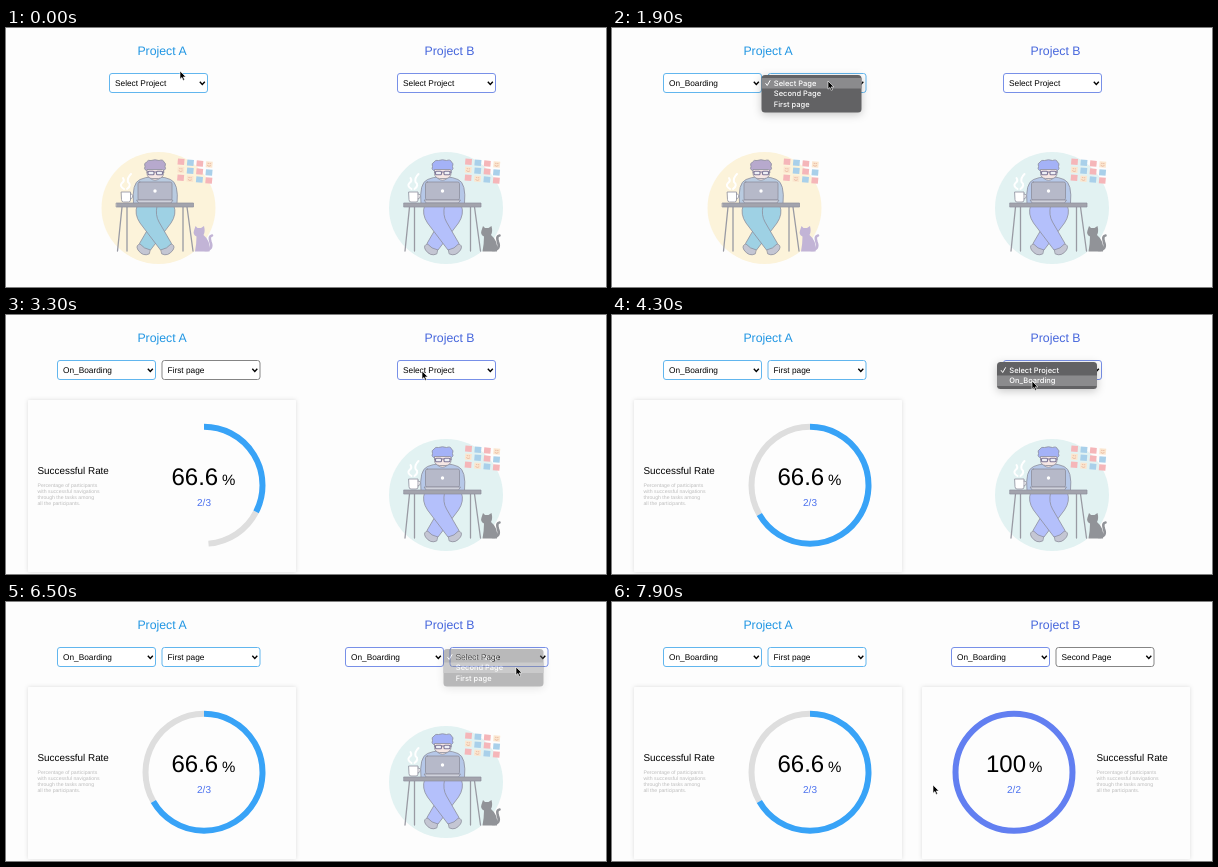
These frames come from a looping animation (600 by 259 pixels, 8000 ms). An HTML page:

```html
<!DOCTYPE html>
<html lang="en">
<head>
<meta charset="utf-8">
<title>Project comparison</title>
<style>
html, body { margin: 0; width: 100%; height: 100%; overflow: hidden; background: #fdfdfd; }
svg { display: block; width: 600px; height: 259px; font-family: "Liberation Sans", Arial, sans-serif; text-rendering: geometricPrecision; }
.card { fill: #fdfdfd; filter: drop-shadow(0 0 2px rgba(0,0,0,.13)); }
.menu { filter: drop-shadow(0 2px 4px rgba(0,0,0,.22)); font-family: Inter, sans-serif; font-weight: 500; }
</style>
</head>
<body>
<svg id="stage" viewBox="0 0 600 259"></svg>
<script>
const LOOP = 8000;
const stage = document.getElementById('stage');

const text = (x, y, size, fill, str, anchor = 'start') =>
  `<text x="${x}" y="${y}" font-size="${size}" fill="${fill}" text-anchor="${anchor}">${str}</text>`;
const clamp = v => Math.max(0, Math.min(1, v));

// Solves cubic-bezier(.25,.1,.25,1) for progress p.
function ease(p) {
  let lo = 0, hi = 1;
  for (let i = 0; i < 20; i++) {
    const u = (lo + hi) / 2, v = 1 - u;
    if (.75 * v * v * u + .75 * v * u * u + u * u * u < p) lo = u; else hi = u;
  }
  const u = (lo + hi) / 2, v = 1 - u;
  return .3 * v * v * u + 3 * v * u * u + u * u * u;
}

const sides = [
  {
    title: 'Project A', mid: 156, titleColor: '#2196e3', border: '#62b6ee',
    single: 103.5, pair: [51.5, 156], artX: 0,
    art: { disc: '#fcf3da', hair: '#b7a9cd', shirt: '#b9cbe0', jeans: '#9ed1e4', cat: '#c2b4d6' },
    project: { open: 250, close: 1000 }, page: { open: 1750, close: 2550 },
    pages: 'First page', cardAt: 2800, ringAt: 2985, grayUntil: 3650,
    card: 22, ring: 198, copy: 31.5, color: '#38a3f7', share: 2 / 3,
    value: '66.6', valueX: 165.5, percentX: 216, ratio: '2/3'
  },
  {
    title: 'Project B', mid: 443.5, titleColor: '#4666dc', border: '#7890e8',
    single: 391.5, pair: [339.5, 444], artX: 287.5,
    art: { disc: '#e2f2f2', hair: '#a4b2f7', shirt: '#b6c8e8', jeans: '#b4c0fb', cat: '#919398' },
    project: { open: 3650, close: 4400 }, page: { open: 5550, close: 6400 },
    pages: 'Second Page', cardAt: 6650, ringAt: 6700, grayUntil: Infinity,
    card: 310, ring: 402, copy: 484.5, color: '#627ff1', share: 1,
    value: '100', valueX: 374, percentX: 417, ratio: '2/2'
  }
];

// Cursor tip: time, x, y
const path = [
  [0, 174, 43], [200, 175, 51], [450, 175, 52], [900, 171, 66], [1100, 171, 66],
  [1650, 216, 53], [1950, 216, 53], [2400, 203, 76], [2600, 203, 76],
  [3250, 416, 56], [3800, 417, 56], [4200, 420, 66], [4500, 420, 66],
  [5100, 522, 62], [5250, 522, 62], [5500, 512, 56], [5750, 512, 56],
  [6150, 510, 65], [6550, 510, 65], [7400, 321, 183], [LOOP, 321, 183]
];

function cursorAt(t) {
  const i = Math.max(1, path.findIndex(k => k[0] > t));
  const [t0, x0, y0] = path[i - 1], [t1, x1, y1] = path[i];
  const p = clamp((t - t0) / (t1 - t0)), s = p * p * (3 - 2 * p);
  return { x: x0 + (x1 - x0) * s, y: y0 + (y1 - y0) * s };
}

function notes() {
  const colors = ['#f5b6b9', '#a9d0ea', '#fbe6cf'];
  const order = [0, 1, 0, 2, 2, 1, 0, 1, 0, 2, 1, 0];
  return order.map((c, i) => {
    const col = i % 4, row = i >> 2;
    const x = 172 + col * 9.4 - row * .2, y = 130.500 + row * 8 + col * .9;
    const mark = c === 2 ? `<path d="M${x + 1.6} ${y + 4.2}q1.6 1.5 3.2 0M${x + 2} ${y + 2}h.6M${x + 4} ${y + 2}h.6" stroke="#e0a58e" stroke-width=".6" fill="none"/>` : '';
    return `<g transform="rotate(5 ${x} ${y})"><rect x="${x}" y="${y}" width="6.6" height="6" fill="${colors[c]}"/>${mark}</g>`;
  }).join('');
}
const noteWall = notes();

function worker({ art: c, artX }) {
  const line = '#8d8f9c';
  // One leg with its shoe, running from the left hip to the right foot.
  const leg = `
    <path d="M155 221L164 215.500Q170 217 167 222Q162 229 156 226Z" fill="#c4c6d3"/>
    <path d="M131 178Q128 186 134 195L154.500 222Q161 221 165.500 215.500L153 194Q149 187 151 178Z" fill="${c.jeans}"/>`;
  return `<g transform="translate(${artX})" stroke-linejoin="round" stroke-linecap="round">
    <ellipse cx="152.5" cy="180" rx="57" ry="56" fill="${c.disc}"/>
    ${noteWall}
    <g stroke="${line}" stroke-width=".8">
      <g transform="matrix(-1 0 0 1 299 0)">${leg}</g>${leg}
      <path d="M127.500 176Q125.500 155 134 151.500Q140 149 145 149h8Q159 149 164.500 151.500Q173 155 171 176z" fill="${c.shirt}"/>
      <path d="M144.500 147v3.500q4.500 3.500 9 0v-3.500z" fill="#f6e7e4"/>
      <rect x="141" y="136" width="16.500" height="14.500" rx="5" fill="#f6e7e4"/>
      <path d="M140 142.500q-2.500-1.500-1-4q-1.500-3 1.500-4.500q1.500-2.500 4.500-1.500q4-1.500 8 0q4-1.500 5 1.500q2.500 1.500 1 4.500q1.500 2.500-1 4l-1.500-1h-15z" fill="${c.hair}"/>
    </g>
    <g fill="#eef0f6" stroke="#7f7898" stroke-width="1.100">
      <path d="M141 144h17" fill="none"/>
      <rect x="142" y="143.300" width="6" height="3.400" rx="1"/><rect x="150.500" y="143.300" width="6" height="3.400" rx="1"/>
    </g>
    <g stroke="${line}" stroke-width=".8">
      <rect x="132" y="154" width="34" height="18" rx="1.800" fill="#b6b9c9"/>
      <path d="M131 172h36l-2 3h-32z" fill="#cfd1db"/>
      <path d="M115.500 164h9v8q0 2-2 2h-5q-2 0-2-2zM124.500 166q3 0 2 3q-.5 2-2 2" fill="#fff"/>
    </g>
    <circle cx="149" cy="163" r="1.700" fill="#fff"/>
    <path d="M118 161q-5-3-2-6q3-2 1-5M121 161q5-4 1-7q-1-4 3-8" fill="none" stroke="#fff" stroke-width="2"/>
    <path d="M116 179L111.500 223M121 179V223M177 179V223M181 179L187 223" stroke="#999aa3" stroke-width="1.300"/>
    <rect x="110.500" y="175" width="77" height="4" fill="#a3a4ad" stroke="${line}" stroke-width=".7"/>
    <path d="M199 222Q207.500 222 204.500 214Q202.500 208 206 207.500" fill="none" stroke="${c.cat}" stroke-width="2.600"/>
    <path d="M189.500 198l2 2h3.500l3-2q1.500 6-.5 9q7.500 6 6 16.500h-14.500q1.500-8 1.500-15q-4-2-2.500-6z" fill="${c.cat}"/>
  </g>`;
}

const select = (x, label, border) =>
  `<rect x="${x}" y="45.500" width="98" height="19" rx="2.500" fill="#fff" stroke="${border}"/>
  ${text(x + 5.5, 58, 8.3, '#000', label)}
  <path d="M${x + 90.3} 53.700l2.500 2.700l2.500-2.700" fill="none" stroke="#000" stroke-width="1.400"/>`;

function menu(selectX, items, span, t, cursor) {
  const alpha = t < span.open ? 0 : 1 - clamp((t - span.close) / 180);
  if (!alpha) return '';
  const x = selectX - 6.5, row = 10.5;
  const hot = Math.max(0, Math.min(items.length - 1, Math.floor((cursor.y - 49) / row)));
  return `<g class="menu" opacity="${alpha}">
    <rect x="${x}" y="47" width="100" height="${6 + row * items.length}" rx="3.500" fill="#626264"/>
    <rect x="${x}" y="${50 + hot * row}" width="100" height="${row}" fill="#8b8b8d"/>
    <path d="M${x + 4} 55.200l1.700 2.300l3-5.200" fill="none" stroke="#fff" stroke-width="1"/>
    ${items.map((s, i) => text(x + 12.3, 57.9 + i * row, 7.5, '#fff', s)).join('')}
  </g>`;
}

function arc(cx, from, to, color) {
  if (to - from < .001) return '';
  const r = 58.5, cy = 170.3;
  if (to - from > .9995) return `<circle cx="${cx}" cy="${cy}" r="${r}" fill="none" stroke="${color}" stroke-width="6"/>`;
  const at = f => `${cx + r * Math.sin(f * 2 * Math.PI)} ${cy - r * Math.cos(f * 2 * Math.PI)}`;
  return `<path d="M${at(from)}A${r} ${r} 0 ${+(to - from > .5)} 1 ${at(to)}" fill="none" stroke="${color}" stroke-width="6"/>`;
}

const copyLines = ['Percentage of participants', 'with successful navigations', 'through the tasks among', 'all the participants.'];

function card(s, t) {
  const sweep = ease(clamp((t - s.ringAt) / 1100));
  return `<rect class="card" x="${s.card}" y="85" width="268" height="172" rx="1"/>
    ${text(s.copy, 159, 9.9, '#000', 'Successful Rate')}
    ${copyLines.map((l, i) => text(s.copy, 172 + i * 6, 5.15, '#bdbdbd', l)).join('')}
    ${arc(s.ring, s.share * sweep, sweep, '#dedede')}${arc(s.ring, 0, s.share * sweep, s.color)}
    ${text(s.valueX, 170, 24, '#000', s.value)}${text(s.percentX, 170, 15, '#000', '%')}
    ${text(s.ring, 191, 10, '#4a70ee', s.ratio, 'middle')}`;
}

function panel(s, t) {
  const gray = '#858585';
  const hasProject = t >= s.project.close + 200, hasPage = t >= s.page.close + 200;
  const selects = hasProject
    ? select(s.pair[0], 'On_Boarding', t < s.page.open - 50 ? gray : s.border) +
      select(s.pair[1], hasPage ? s.pages : 'Select Page', hasPage && t < s.grayUntil ? gray : s.border)
    : select(s.single, 'Select Project', s.border);
  return text(s.mid, 27, 12.3, s.titleColor, s.title, 'middle') + selects +
    (t < s.cardAt ? worker(s) : card(s, t));
}

function draw(t) {
  const cursor = cursorAt(t);
  const menus = s =>
    menu(s.single, ['Select Project', 'On_Boarding'], s.project, t, cursor) +
    menu(s.pair[1], ['Select Page', 'Second Page', 'First page'], s.page, t, cursor);
  stage.innerHTML = sides.map(s => panel(s, t)).join('') + sides.map(menus).join('') +
    `<path transform="translate(${cursor.x} ${cursor.y})" d="M0 0V8.200L1.900 6.400L3.200 9.400L4.600 8.800L3.300 5.900H5.900Z" fill="#000" stroke="#fff" stroke-width=".6"/>`;
}

function tick(now) {
  draw(now % LOOP);
  requestAnimationFrame(tick);
}
draw(0);
requestAnimationFrame(tick);
</script>
</body>
</html>
```
